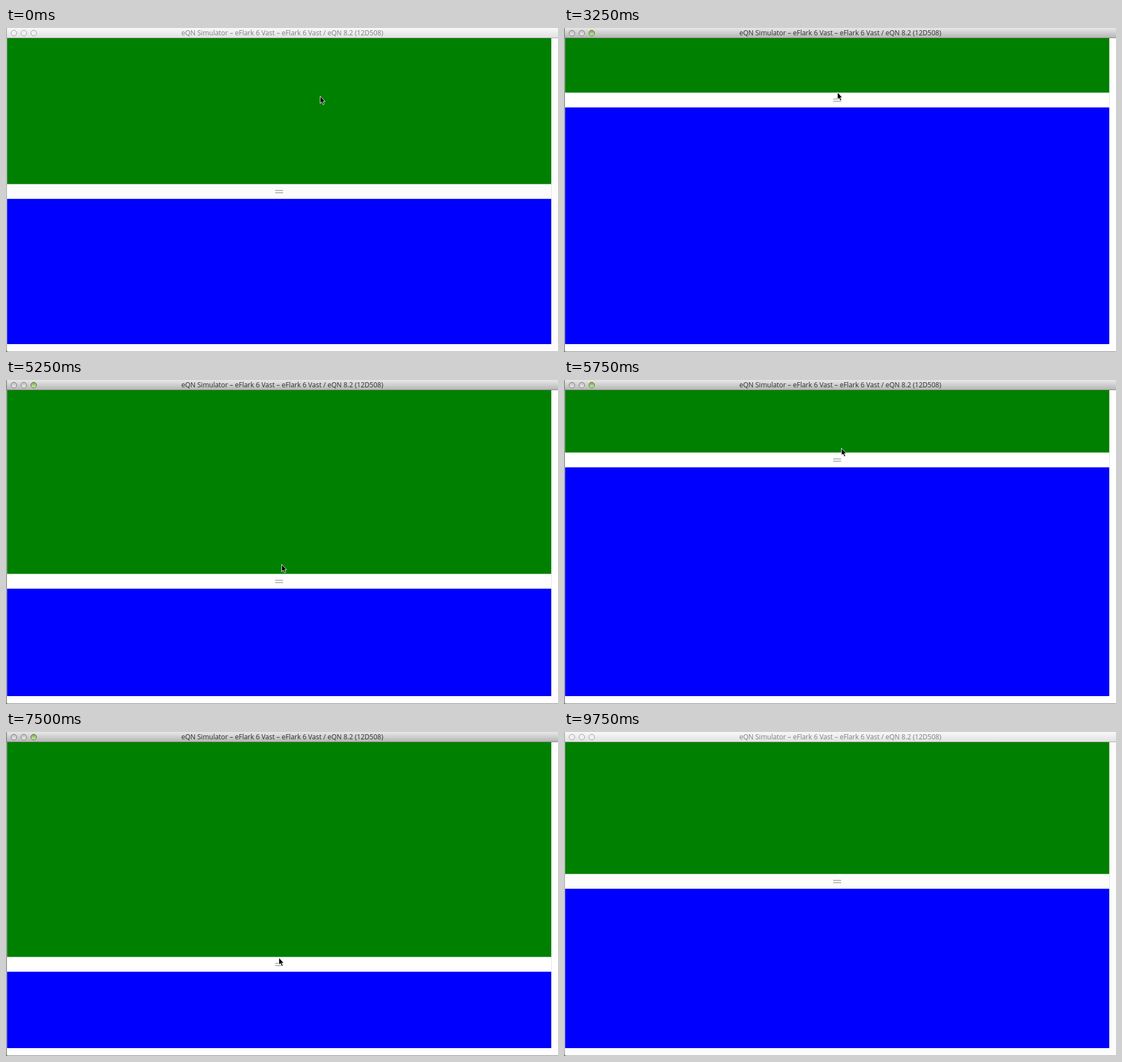
An HTML page for the animation above (10 s loop, 976x574 px).

```html
<!DOCTYPE html>
<html lang="en">
<head>
<meta charset="utf-8">
<title>Split view</title>
<style>
  html, body { margin: 0; width: 100%; height: 100%; overflow: hidden; background: #fff; }
  svg { display: block; width: 976px; height: 574px; }
  .chrome { fill: url(#lit); }
  .page { fill: #fff; }
  .edge { fill: #868686; }
  .title { font: 12px "Open Sans", "Noto Sans", sans-serif; text-anchor: middle; fill: #2e2e2e; }
  .lights { fill: url(#bead); stroke: #7c7c7c; }
  .zoom { fill: url(#lime); stroke: #55733f; }
  .idle .chrome { fill: url(#dim); }
  .idle .page { fill: #fcfcfc; }
  .idle .edge { fill: #a9a9a9; }
  .idle .title { fill: #808080; }
  .idle .lights, .idle .zoom { fill: #f0f0f0; stroke: #a0a0a0; }
</style>
</head>
<body>
<svg id="stage" viewBox="0 0 976 574">
  <defs>
    <linearGradient id="lit" x2="0" y2="1"><stop stop-color="#e8e8e8"/><stop offset="1" stop-color="#b6b6b6"/></linearGradient>
    <linearGradient id="dim" x2="0" y2="1"><stop stop-color="#f8f8f8"/><stop offset="1" stop-color="#e2e2e2"/></linearGradient>
    <linearGradient id="bead" x2="0" y2="1"><stop stop-color="#b8b8b8"/><stop offset="1" stop-color="#f0f0f0"/></linearGradient>
    <linearGradient id="lime" x2="0" y2="1"><stop stop-color="#76a650"/><stop offset="1" stop-color="#d3f3ae"/></linearGradient>
  </defs>
  <rect class="page" width="976" height="574"/>
  <rect class="chrome" width="976" height="17"/>
  <rect class="edge" y="17" width="976" height="1"/>
  <rect class="edge" width="1.5" height="574"/>
  <rect class="edge" y="573" width="976" height="1"/>
  <path d="M0 569 Q1 574 6 574 H0Z" fill="#777"/>
  <g class="lights">
    <circle cx="14" cy="9" r="5"/>
    <circle cx="31.5" cy="9" r="5"/>
    <circle class="zoom" cx="49" cy="9" r="5"/>
  </g>
  <text class="title" x="488.5" y="13">eQN Simulator – eFlark 6 Vast – eFlark 6 Vast / eQN 8.2 (12D508)</text>

  <rect x="964" y="18" width="1" height="542" fill="#e4e4e4"/>
  <rect x="2" y="18" width="962" height="542" fill="#00f"/>
  <rect id="upper" x="2" y="18" width="962" fill="#008000"/>
  <g id="bar">
    <rect class="page" x="2" y=".5" width="962" height="26.2"/>
    <path d="M476 11.9h14M476 15.9h14" stroke="#8c9292" stroke-width="1.4"/>
  </g>
  <path id="arrow" d="M.5 .7V13.6L3.3 11 5.5 15.8 7.7 14.8 5.6 10.2H9.2Z" stroke="#fff" stroke-width=".9"/>
</svg>
<script>
const STEP = 250, LOOP = 10000;
const LAG = 0.33; // ticks by which the divider trails the pointer

// Turning points as [tick, value]
const split = [[0, 276], [10.4, 276], [14, 79], [19.3, 436], [24.4, 63], [28.9, 424], [33.2, 251], [41, 251]];
const pointerX = [[0, 555], [3, 474], [4, 483], [17, 483], [26, 492], [30, 482], [34, 492], [35, 492], [37, 499], [41, 499]];
const grip = [[0, -156], [3.5, 18], [35, 18], [37, 28], [41, 28]];

const [stage, upper, bar, arrow] = ["stage", "upper", "bar", "arrow"].map(id => document.getElementById(id));

// Cosine swing from one turning point to the next
function swing(points, t) {
  const i = points.findIndex(p => p[0] > t);
  const [t0, a] = points[i - 1], [t1, b] = points[i];
  return Math.round(a + (b - a) * (1 - Math.cos(Math.PI * (t - t0) / (t1 - t0))) / 2);
}

function draw(now) {
  const tick = Math.floor(now % LOOP / STEP);
  const top = swing(split, tick);
  const x = swing(pointerX, tick);
  const y = swing(split, tick + LAG) + swing(grip, tick);
  stage.classList.toggle("idle", tick < 10 || tick > 38);
  upper.setAttribute("height", top - 17);
  bar.setAttribute("transform", `translate(0 ${top})`);
  arrow.setAttribute("transform", `translate(${x} ${y})`);
  arrow.style.display = tick > 38 ? "none" : "";
}

const start = performance.now();
function loop() {
  draw(performance.now() - start);
  requestAnimationFrame(loop);
}
loop();
</script>
</body>
</html>
```
